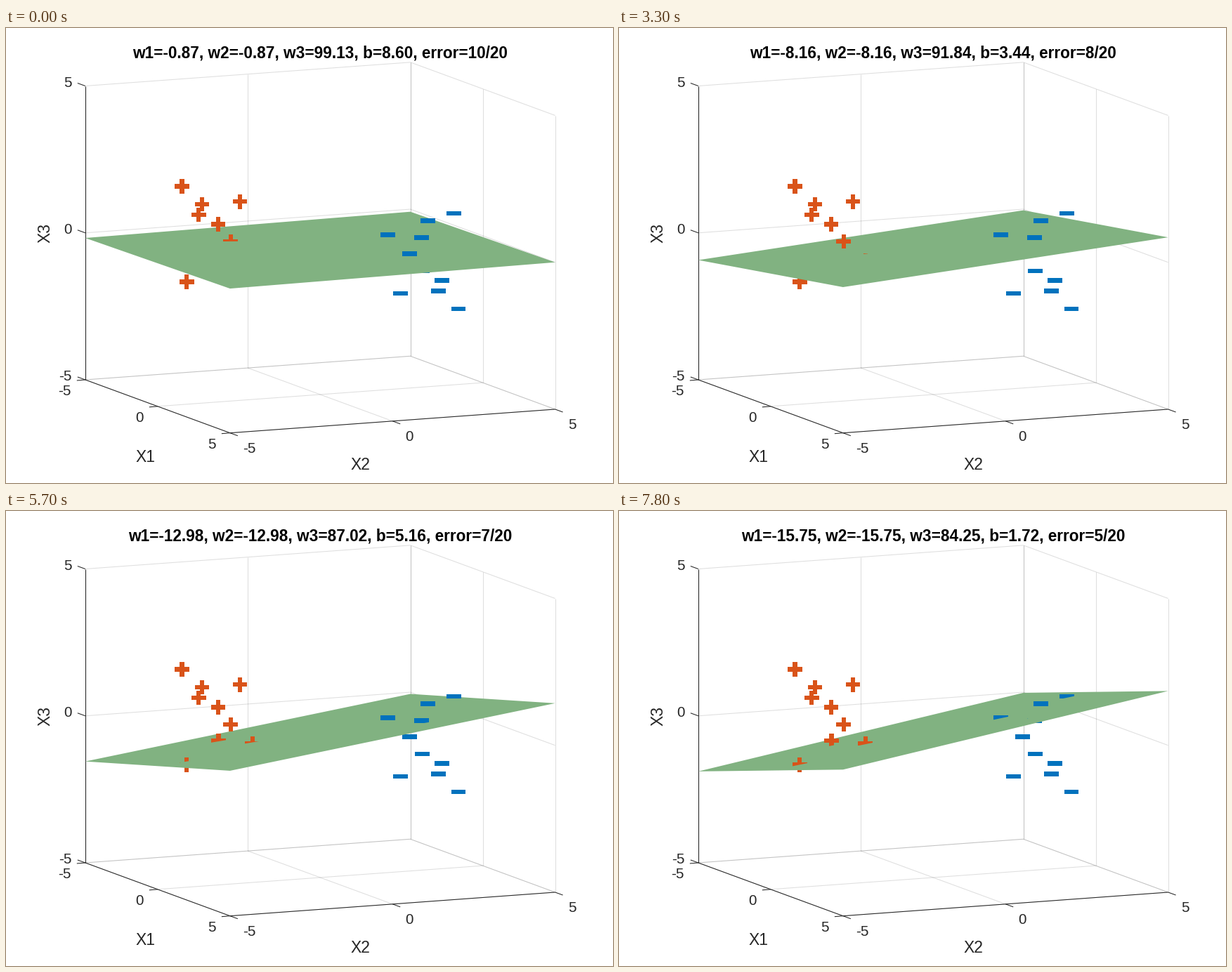
Write a matplotlib script that moves like this. It is 864 px wide and 648 px high and loops after 8000 ms.

```python
import numpy as np
import matplotlib.pyplot as plt
from matplotlib.animation import FuncAnimation
from matplotlib.patches import Polygon
from matplotlib.path import Path

W, H, DPI = 864, 648, 100
PX = 72 / DPI
plt.rcParams["font.family"] = "Liberation Sans"
DARK, GREEN, ORANGE, BLUE = "#262626", "#81b281", "#d95319", "#0072bd"

# Orthographic camera: centre of the box and pixels per unit on screen
CX, CY = 447.2, 312.75
SCALE_X, SCALE_Y = 50.65, 42.66
AZ, EL = np.radians(66), np.radians(11.2)
SIN_AZ, COS_AZ, SIN_EL, COS_EL = np.sin(AZ), np.cos(AZ), np.sin(EL), np.cos(EL)

# Positive samples; the negative class is their reflection in the origin
POSITIVE = np.array([
    (-2.57, -1.61, -0.125), (0.37, -4.27, -0.755), (-3.08, -1.755, -0.76),
    (-1.02, -1.63, -0.487), (-2.14, -2.363, -1.113), (-1.58, -3.548, 2.082),
    (-1.35, -3.035, 1.478), (-1.39, -3.122, 1.115), (-0.92, -2.057, 1.564),
    (-1.16, -2.62, 0.798)])
SAMPLES = np.vstack([POSITIVE, -POSITIVE])
LABELS = np.repeat([1, -1], len(POSITIVE))

# Key points of the training: step, shared weight, bias in units of BIAS_STEP
BIAS_STEP = 1.72
STEPS, WEIGHTS, BIASES = zip((0, -0.87, 5), (4, -3.79, 3), (11, -8.16, 2),
                             (15, -10.52, 3), (19, -12.98, 3),
                             (23, -14.82, -1), (26, -15.75, 1))

fig = plt.figure(figsize=(W / DPI, H / DPI), dpi=DPI, facecolor="white")
ax = fig.add_axes([0, 0, 1, 1])
ax.set_xlim(0, W)
ax.set_ylim(H, 0)
ax.axis("off")


def distance(x1, x2):
    """Horizontal distance away from the viewer."""
    return COS_AZ * x2 - SIN_AZ * x1


def project(x1, x2, x3):
    right = COS_AZ * x1 + SIN_AZ * x2
    up = SIN_EL * distance(x1, x2) + COS_EL * x3
    return CX + SCALE_X * right, CY - SCALE_Y * up


def line(p, q, alpha=1.0):
    ax.plot(*zip(p, q), color=DARK, alpha=alpha, lw=1.05 * PX, zorder=1,
            solid_capstyle="butt")


def label(x, y, text, size=22.9, ha="center", color=DARK, **kw):
    return ax.text(x, y, text, fontsize=size * PX, ha=ha, va="baseline",
                   color=color, zorder=6, **kw)


def tick(point, value, mark, offset, ha):
    x, y = point
    line(point, (x + mark[0], y + mark[1]))
    label(x + offset[0], y + offset[1], str(value), 20.8, ha)


def draw_axes():
    for t in (-5, 0, 5):
        grid = [((t, -5, -5), (t, 5, -5)), ((-5, t, -5), (5, t, -5)),
                ((-5, t, -5), (-5, t, 5)), ((-5, -5, t), (-5, 5, t)),
                ((t, 5, -5), (t, 5, 5)), ((-5, 5, t), (5, 5, t))]
        for a, b in grid:
            line(project(*a), project(*b), alpha=0.15)
        tick(project(t, -5, -5), t, (-12, 1), (-20.5, 22.5), "right")
        tick(project(5, t, -5), t, (11, 4), (18.5, 28), "left")
        tick(project(-5, -5, t), t, (-11, -4), (-19, 1.5), "right")
    for a, b in (((-5, -5, -5), (-5, -5, 5)), ((-5, -5, -5), (5, -5, -5)),
                 ((5, -5, -5), (5, 5, -5))):
        line(project(*a), project(*b))
    label(198, 618, "X1")
    label(504, 629, "X2")
    label(62, 292, "X3", rotation=90, rotation_mode="anchor")


def marker_outline(x, y, positive, arm=10.4, half=3.2):
    if not positive:
        pts = [(-arm, -half), (arm, -half), (arm, half), (-arm, half)]
        return np.array(pts) + (x, y)
    arm_tip = np.array([(-half, -half), (-half, -arm), (half, -arm)])
    quarter_turn = np.array([(0, 1), (-1, 0)])
    turns = [arm_tip @ np.linalg.matrix_power(quarter_turn, n)
             for n in range(4)]
    return np.vstack(turns) + (x, y)


def add_marker(sample, positive, zorder):
    outline = marker_outline(*project(*sample), positive)
    return ax.add_patch(Polygon(outline, color=ORANGE if positive else BLUE,
                                lw=0, zorder=zorder))


def front_region(sample, w, w3, b):
    """Part of the screen where the plane lies behind the sample's marker."""
    slope = -w / w3
    tilt = SIN_EL - (SIN_AZ - COS_AZ) * COS_EL * slope
    skew = (SIN_AZ + COS_AZ) * COS_EL * slope
    up = (CY - project(*sample)[1]) / SCALE_Y
    right = (np.array([0, W]) - CX) / SCALE_X
    edge = (tilt * (distance(*sample[:2]) - SIN_EL * up) + skew * right
            - COS_EL * b / w3) / (1 - tilt * SIN_EL)
    left_y, right_y = CY - SCALE_Y * edge
    return Path([(0, -H), (0, left_y), (W, right_y), (W, -H), (0, -H)])


draw_axes()
title = label(447, 42, "", 22.6, color="black", weight="bold")
plane = ax.add_patch(Polygon(np.eye(3, 2), color=GREEN, lw=0, zorder=3))
# Each marker is drawn behind the plane and, clipped, in front of it
for sample, sign in zip(SAMPLES, LABELS):
    add_marker(sample, sign > 0, 2)
front_markers = [add_marker(s, sign > 0, 4) for s, sign in zip(SAMPLES, LABELS)]


def update(i):
    step = i // 3
    w = np.interp(step, STEPS, WEIGHTS)
    b = BIAS_STEP * int(round(np.interp(step, STEPS, BIASES)))
    w3 = 100 + w
    errors = np.sum(LABELS * (SAMPLES @ (w, w, w3) + b) < 0)
    corners = [(-5, -5), (-5, 5), (5, 5), (5, -5)]
    plane.set_xy([project(p, q, -(b + w * (p + q)) / w3) for p, q in corners])
    for sample, patch in zip(SAMPLES, front_markers):
        patch.set_clip_path(front_region(sample, w, w3, b), ax.transData)
    title.set_text(f"w1={w:.2f}, w2={w:.2f}, w3={w3:.2f}, "
                   f"b={b:.2f}, error={errors}/20")
    return [plane, title, *front_markers]


anim = FuncAnimation(fig, update, frames=80, interval=100, repeat=True,
                     repeat_delay=0, blit=False)
plt.show()
```
